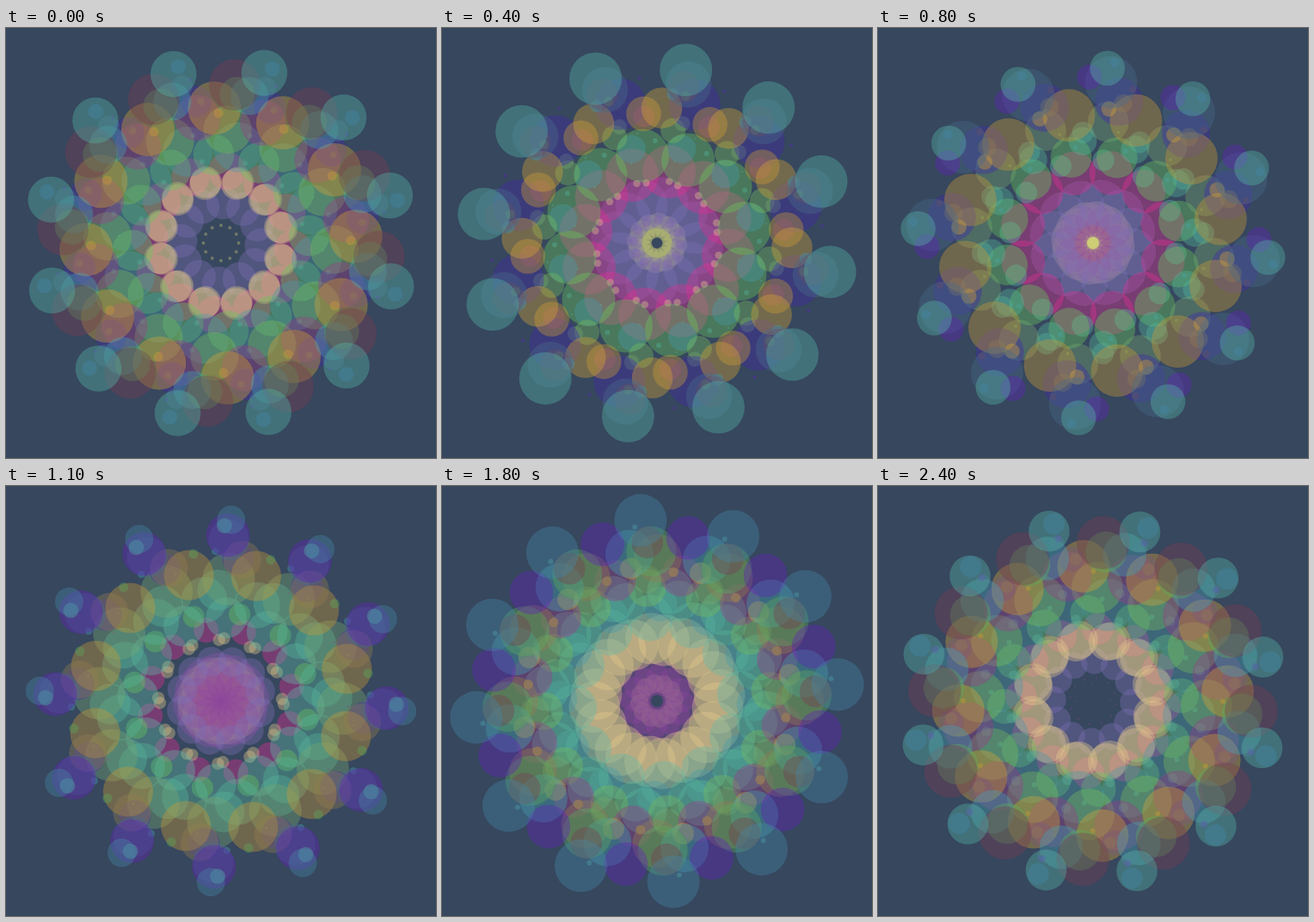
Write an HTML page with a canvas that moves like this. It is 500 by 500 pixels and loops after 2.5 s.

```html
<!DOCTYPE html>
<html lang="en">
<head>
<meta charset="utf-8">
<title>Pulsing rings</title>
<style>
  html, body { margin: 0; width: 100%; height: 100%; overflow: hidden; background: #36475e; }
  canvas { display: block; width: 500px; height: 500px; }
</style>
</head>
<body>
<canvas id="stage" width="500" height="500"></canvas>
<script>
const LOOP = 2500, STEP = 100, ARMS = 12, MAX = 31;
const ctx = document.getElementById('stage').getContext('2d');

// distance, start angle in degrees, direction, time of largest size in s, colour
const rings = [
  [20.5, 0, 1, 1.05, '#cdcd78'],
  [27, 8, -1, 1.3, '#8c469b'],
  [47, 3, 1, 0.52, '#7d6eb4'],
  [84, 5, 1, 0.45, '#e12e94'],
  [73, 16, -1, 1.95, '#e1c88c'],
  [71, -15, 1, 1.95, '#e1c88c'],
  [97, 16.8, -1, 1.5, '#5fb9a5'],
  [103, 25.3, -1, 0.4, '#66c859'],
  [113, 10, 1, 2.3, '#4998a6'],
  [119, 3.8, -1, 1.4, '#55b69a'],
  [129, -14.8, 1, 1.5, '#55b69a'],
  [132, 3.3, 1, 2.25, '#78bc59'],
  [142, 16.8, -1, 1.2, '#73a56e'],
  [148, 19.3, 1, 2.2, '#9b3a88'],
  [167, 20, -1, 0.55, '#4328ac'],
  [151, 28.9, -1, 0.9, '#cb9836'],
  [157, -2.8, 1, 0, '#d6a436'],
  [166, 21.8, -1, 1.55, '#907b53'],
  [174, 11, -1, 2.05, '#43a4b2'],
  [174, 6.2, 1, 2, '#5aaa59'],
  [184.5, 4.9, 1, 2.35, '#783c53'],
  [188, 16, -1, 0.7, '#496988'],
  [193, -10.8, 1, 1.45, '#6320bc'],
  [204, 14.3, -1, 0.3, '#54b6a7'],
  [211, 16.4, -1, 1.7, '#4486a7']
];

function drawRing([dist, start, dir, peak, color], time) {
  const turn = time / LOOP;
  const size = MAX * (0.5 + 0.5 * Math.cos(2 * Math.PI * (turn - peak * 1000 / LOOP)));
  ctx.fillStyle = color;
  for (let i = 0; i < ARMS; i++) {
    const angle = start * Math.PI / 180 + (i + dir * turn) * 2 * Math.PI / ARMS;
    ctx.beginPath();
    ctx.arc(250 + dist * Math.sin(angle), 250 - dist * Math.cos(angle), size, 0, 2 * Math.PI);
    ctx.fill();
  }
}

function draw(time) {
  ctx.globalAlpha = 1;
  ctx.fillStyle = '#36475e';
  ctx.fillRect(0, 0, 500, 500);
  ctx.globalAlpha = 0.38;
  for (const ring of rings) drawRing(ring, time);
}

const begin = performance.now();
function tick() {
  const time = (performance.now() - begin) % LOOP;
  draw(Math.floor(time / STEP) * STEP);
  requestAnimationFrame(tick);
}
tick();
</script>
</body>
</html>
```
